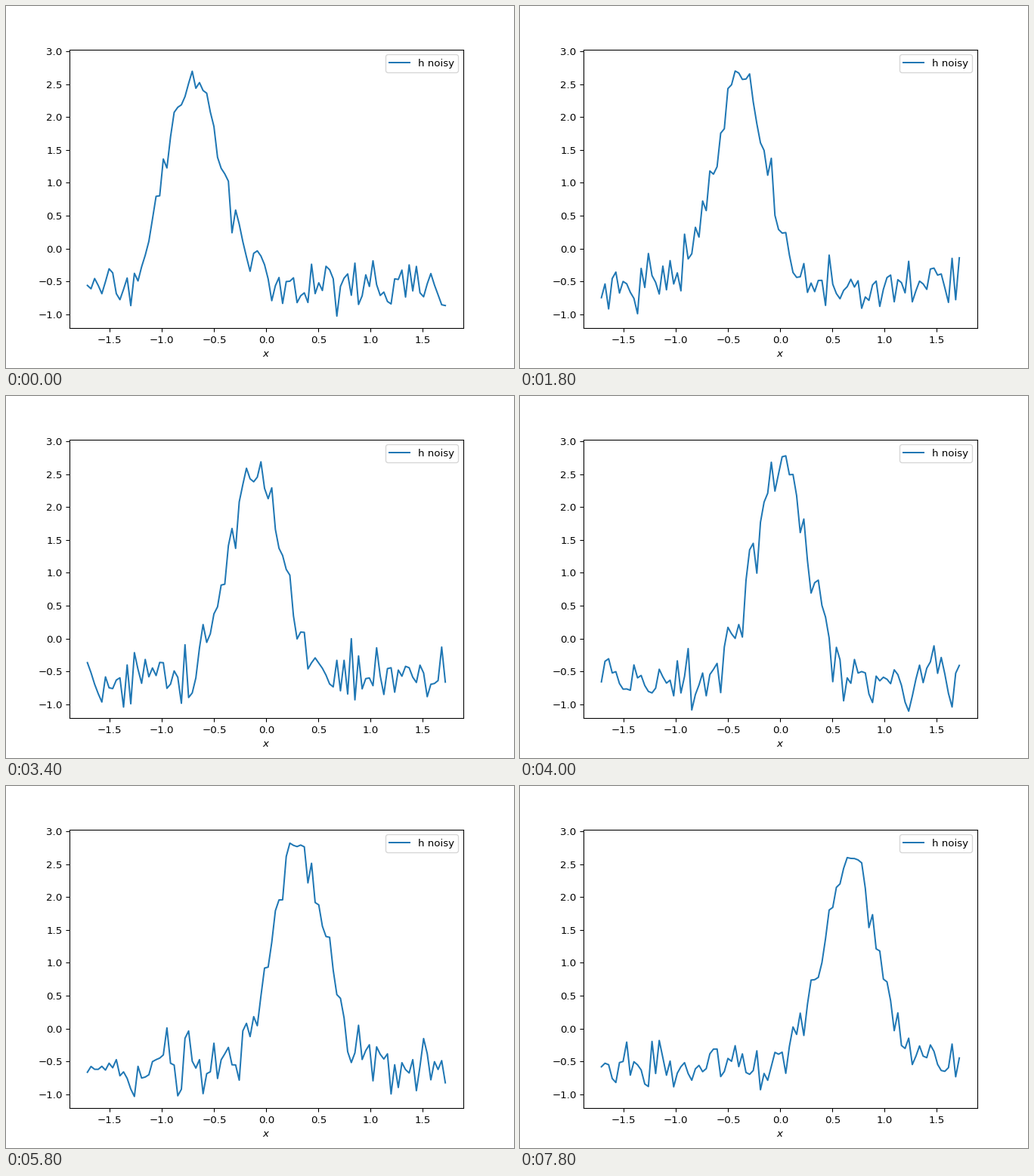
A matplotlib script for the animation above (8000 ms loop, 672 by 480 pixels).

```python
import numpy as np
import matplotlib.pyplot as plt
from matplotlib.animation import FuncAnimation

FRAMES, STEP_MS = 40, 200
N = 100
START, SPEED, WIDTH = -0.70, 0.0349, 0.25
NOISE = 0.2


def standardize(v):
    return (v - v.mean()) / v.std()


x = standardize(np.linspace(-1, 1, N))


def signal(frame):
    """Gaussian bump drifting right at constant speed, with fresh noise."""
    center = START + SPEED * frame
    bump = standardize(np.exp(-0.5 * ((x - center) / WIDTH) ** 2))
    rng = np.random.default_rng(frame)
    return bump + rng.normal(0, NOISE, N)


plt.rcParams["font.family"] = "DejaVu Sans"
fig, ax = plt.subplots(figsize=(7, 5), dpi=96)
line, = ax.plot(x, signal(0), color="#1f77b4", lw=1.5, label="h noisy")
ax.set_ylim(-1.2107, 3.0277)
ax.set_xlabel("$x$")
ax.legend(loc="upper right")


def update(frame):
    line.set_ydata(signal(frame))
    return line,


anim = FuncAnimation(fig, update, frames=FRAMES, interval=STEP_MS,
                     init_func=lambda: update(0), repeat=True, repeat_delay=0)
plt.show()
```
